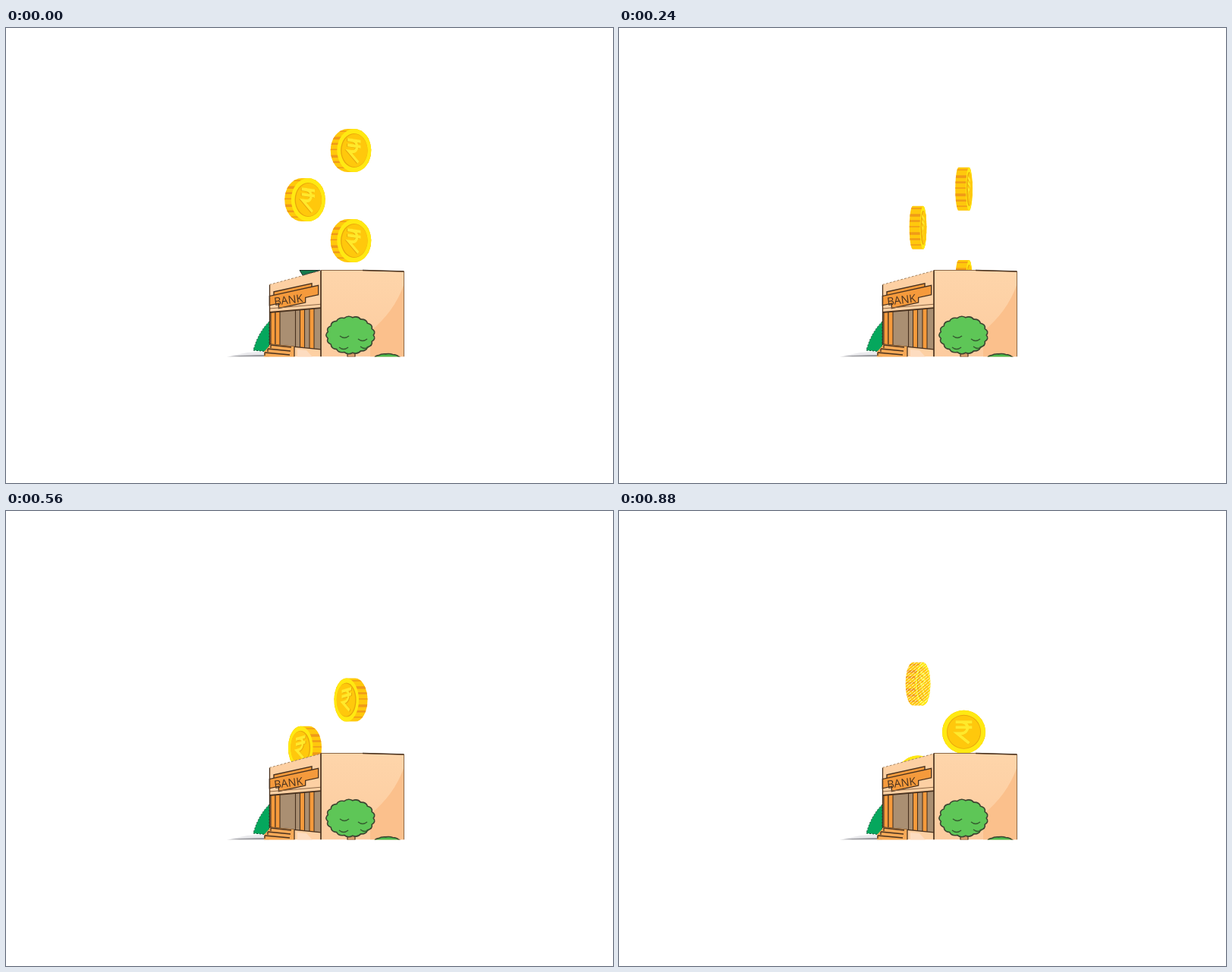
An HTML page with a canvas for the animation above (960 ms loop, 800 by 600 pixels).

```html
<!DOCTYPE html>
<html lang="en">
<head>
<meta charset="utf-8">
<title>Coins into the bank</title>
<style>
html, body { margin: 0; width: 100%; height: 100%; overflow: hidden; background: #fff; }
canvas { display: block; }
</style>
</head>
<body>
<canvas id="stage" width="800" height="600"></canvas>
<script>
const ctx = document.getElementById('stage').getContext('2d');
const TAU = Math.PI * 2;
const STEP = 80, STEPS = 12;
const RADIUS = 28.5, THICK = 14, ENTRY = 9;
const INK = '#49321f', WOOD = '#f59a3c', GLASS = '#aa8f72', GOLD = '#ffc80c';
const LEFT = 347, CORNER = 415, RIGHT = 524.5, BASE = 433.5;

function shape(path, fill, stroke, width = 1.4) {
  const outline = new Path2D(path);
  if (fill) { ctx.fillStyle = fill; ctx.fill(outline); }
  if (stroke) { ctx.strokeStyle = stroke; ctx.lineWidth = width; ctx.stroke(outline); }
}

function line(x1, y1, x2, y2, color = INK, width = 1.3) {
  shape(`M${x1} ${y1}L${x2} ${y2}`, null, color, width);
}

function disc(x, rx, ry, fill) {
  ctx.beginPath();
  ctx.ellipse(x, 0, rx, ry, 0, 0, TAU);
  ctx.fillStyle = fill;
  ctx.fill();
}

// ---- Coins ----

// Half a turn over the loop, lingering a little when edge-on.
function spinAt(step) {
  const degrees = 38 + 13 * step - 6 * Math.sin((step - 4) * Math.PI / 4);
  return Math.min(degrees, 180) * Math.PI / 180;
}

// The tall fall starts fast, settles to a steady speed and skips ahead once.
function tallFall(step) {
  const t = step < ENTRY ? step : step + 1;
  return 161.5 + 8.4 * t + 29 * (1 - Math.exp(-t / 1.4));
}

const coins = [
  { x: 454.5, y: tallFall },
  { x: 454.5, y: step => 280.5 + 18 * step, last: 4 },
  { x: 394, y: step => Math.min(226.5 + 12.25 * step, 351) },
  { x: 394, y: step => 208 + 10 * step, first: ENTRY }
];

function rupee(color) {
  shape('M-11-13H11M-11-6H11M-5-13C8-14 8 2-4 2H-9L7 15', null, color, 4);
}

function drawCoin(x, y, angle) {
  const sin = Math.sin(angle), cos = Math.cos(angle);
  const rx = Math.abs(cos) * RADIUS;
  const half = THICK / 2 * sin;
  const lean = Math.sign(cos) * sin;

  ctx.save();
  ctx.translate(x, y);

  // rim
  ctx.save();
  ctx.beginPath();
  ctx.ellipse(-half, 0, rx, RADIUS, 0, TAU / 4, TAU * 3 / 4);
  ctx.ellipse(half, 0, rx, RADIUS, 0, -TAU / 4, TAU / 4);
  ctx.closePath();
  ctx.fillStyle = GOLD;
  ctx.fill();
  ctx.clip();
  ctx.fillStyle = '#f09a18';
  for (let i = 0; i < 7; i++) ctx.fillRect(-30, i * 8 - 26, 60, 1.5 + i * 2 % 3);
  ctx.restore();

  // visible face
  if (rx > 2) {
    ctx.translate(lean * THICK / 2, 0);
    disc(0, rx, RADIUS, '#ffe912');
    disc(0, rx * 0.79, RADIUS * 0.79, '#e9a50c');
    disc(lean, rx * 0.76, RADIUS * 0.76, GOLD);
    ctx.transform(Math.abs(cos), lean * 0.2, 0, 1, 0, 0);
    ctx.save();
    ctx.translate(-lean * 2, sin);
    rupee('#e9a50c');
    ctx.restore();
    rupee('#ffe92b');
  }
  ctx.restore();
}

// White hatching that thins out lets the arriving coin come in gradually.
function hatch(x, y, step) {
  ctx.save();
  ctx.translate(x, y);
  ctx.rotate(-0.7);
  ctx.setLineDash([4, 1]);
  for (let v = -33; v <= 33; v += 3) {
    ctx.lineDashOffset = v * 1.7;
    line(-33, v, 33, v, '#fff', 0.6 * (STEPS - step) + 0.2);
  }
  ctx.restore();
}

// A dotted outline announces the arriving coin.
function glint(x, y) {
  ctx.save();
  ctx.translate(x, y);
  ctx.rotate(0.6);
  ctx.setLineDash([1, 4]);
  ctx.beginPath();
  ctx.ellipse(0, 0, 23, 15, 0, 0, TAU);
  ctx.moveTo(-16, 0);
  ctx.lineTo(16, 0);
  ctx.strokeStyle = '#ffdc18';
  ctx.lineWidth = 1.3;
  ctx.stroke();
  ctx.restore();
}

function drawCoins(step) {
  for (const { x, y, first = 0, last = STEPS } of coins) {
    const age = step - first;
    if (age < 0 || step > last) {
      if (age === -1) glint(x + 3, y(age) - 13);
      continue;
    }
    drawCoin(x, y(age), spinAt(age));
    if (first) hatch(x, y(age), step);
  }
}

// ---- Bank ----

function scallops(cx, cy, rx, ry, count, fill) {
  const at = (i, k) => {
    const a = i / count * TAU;
    return [cx + Math.cos(a) * rx * k, cy + Math.sin(a) * ry * k];
  };
  ctx.beginPath();
  ctx.moveTo(...at(0, 0.96));
  for (let i = 0; i < count; i++) {
    ctx.quadraticCurveTo(...at(i + 0.5, 1.1), ...at(i + 1, 0.96));
  }
  ctx.closePath();
  ctx.fillStyle = fill;
  ctx.fill();
  ctx.strokeStyle = '#3c4430';
  ctx.lineWidth = 1.6;
  ctx.stroke();
}

function drawGround() {
  shape(`M291 ${BASE}L318 428L347 426V${BASE}`, '#e9e9ec');
  shape(`M291 ${BASE}Q310 431 347 431V${BASE}`, '#929297');
  ctx.setLineDash([2, 2]);
  shape('M347 387Q332 402 326 425L347 427Z', '#05a75d', '#174a31', 1);
  ctx.setLineDash([]);
}

function drawSideWall() {
  const shade = ctx.createLinearGradient(0, 320, 0, BASE);
  shade.addColorStop(0, '#fed5aa');
  shade.addColorStop(1, '#fccb9f');
  shape(`M${CORNER} 319.5H480L${RIGHT} 321V${BASE}H${CORNER}Z`, shade);
  shape(`M${RIGHT} 338Q512 374 480 400V${BASE}H${RIGHT}Z`, '#fbc08c');
  shape(`M${CORNER} 319.5H470L${RIGHT} 321V${BASE}`, null, '#8a6848', 1);
  line(470, 319.5, RIGHT, 321);
}

function drawSign() {
  const plank = (x, y, w, h) => `M${x} ${y}h${w}v${h}h${-w}Z`;
  const front = plank(0, 0, 63, 11) + plank(12, 8, 34, 9.5);
  ctx.save();
  ctx.transform(1, -0.22, 0, 1, 348, 354);
  shape(plank(5, -5, 50, 8), WOOD, INK);
  shape(front, null, INK, 2.6);
  shape(front, WOOD);
  ctx.restore();

  ctx.save();
  ctx.translate(354, 366);
  ctx.rotate(-0.13);
  ctx.font = '14.5px "Open Sans", sans-serif';
  ctx.fillStyle = INK;
  ctx.fillText('BANK', 0, 0);
  ctx.restore();
}

function drawEntrance() {
  const top = x => 375 - 0.085 * (x - LEFT);
  const foot = x => 417 + 0.1 * (x - LEFT);
  const post = x => line(x, top(x), x, foot(x), INK, 1.1);
  const pane = (x, w, fill) =>
    shape(`M${x} ${top(x)}L${x + w} ${top(x + w)}V${foot(x + w)}L${x} ${foot(x)}Z`, fill);

  pane(LEFT, CORNER - LEFT, GLASS);
  for (const x of [349, 355, 387.5, 400]) {
    pane(x, 6, WOOD);
    post(x);
    post(x + 6);
  }
  post(381.5);
  line(LEFT, top(LEFT) - 5, CORNER, top(CORNER) - 5, '#8d6845', 1);
  line(LEFT, top(LEFT), CORNER, top(CORNER), INK, 1.8);
  line(LEFT, foot(LEFT), CORNER, foot(CORNER));

  shape('M384 424L396 425L404 434H384Z', '#fddcc0');
  shape('M349 417L380 420V434H340V427Z', '#f6a957');
  for (let i = 0; i < 3; i++) {
    const x = 349 - i * 4, y = 418 + i * 5;
    line(x, y, x + 27 + i * 3, y + 3);
    line(x, y, x, y + 4);
  }
  line(380, 420, 380, BASE);
}

function drawTrees() {
  shape('M450 427V434H460V427', '#d69a68', INK, 1.2);
  scallops(454, 405, 31.5, 24.3, 17, '#5ec657');
  for (const [x, y] of [[440, 406], [464, 410], [439, 421], [467, 420]]) {
    shape(`M${x} ${y}q6 5 12 0`, null, '#355c30', 1.5);
  }
  scallops(502.5, 437, 18, 7.5, 11, '#4cb94b');
}

function drawRoof(step) {
  const phase = step % 8;
  if (phase === 0) shape('M387 319.5H414L391 326Z', '#167a4d', '#1d3028', 1);
  else if (phase < 3) shape('M383 322L388 325L412 319.5L386 327Z', '#49463a');
  ctx.setLineDash([3, 2]);
  line(LEFT, 338.5, CORNER, 320, '#a78765', 1);
  ctx.setLineDash([]);
}

function drawBank(step) {
  ctx.save();
  ctx.beginPath();
  ctx.rect(0, 0, RIGHT + 0.5, BASE);
  ctx.clip();
  drawGround();
  drawSideWall();
  shape(`M${LEFT} 338.5L${CORNER} 320V${BASE}H${LEFT}Z`, '#fdd0a3');
  drawSign();
  drawEntrance();
  drawRoof(step);
  line(LEFT + 0.5, 339, LEFT + 0.5, 418);
  line(CORNER, 319.5, CORNER, BASE, INK, 1.7);
  drawTrees();
  ctx.restore();
}

function render(now) {
  const step = Math.floor(now / STEP) % STEPS;
  ctx.fillStyle = '#fff';
  ctx.fillRect(0, 0, 800, 600);
  drawCoins(step);
  drawBank(step);
}

const start = performance.now();
function tick() {
  render(performance.now() - start);
  requestAnimationFrame(tick);
}
tick();
</script>
</body>
</html>
```
